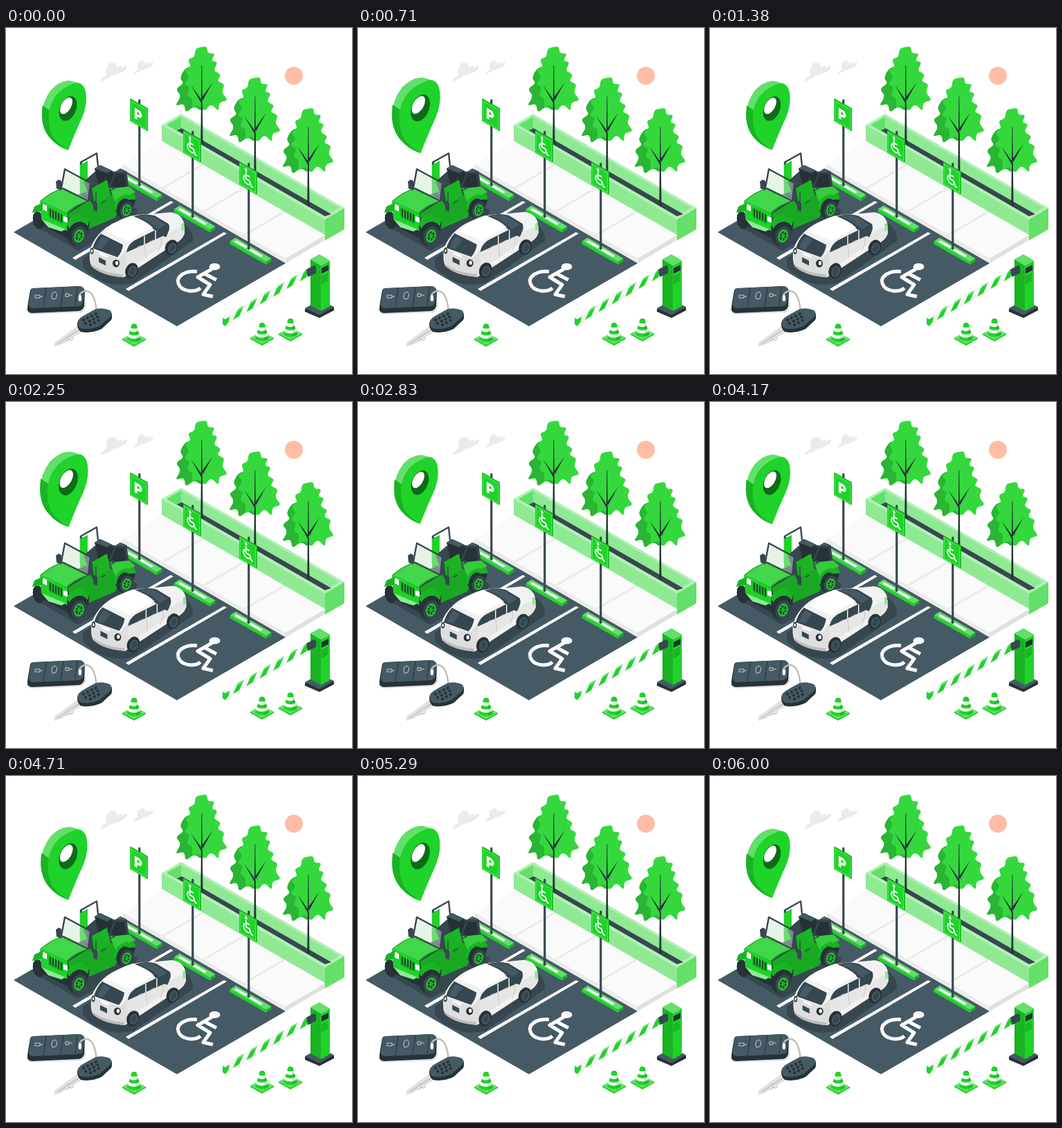
An HTML page that plays this animation: 500 px wide and 500 px high, repeating every 6040 ms.

```html
<!DOCTYPE html>
<html lang="en">
<head>
<meta charset="utf-8">
<title>Isometric car park</title>
<style>
html, body { margin: 0; width: 100%; height: 100%; overflow: hidden; background: #fff }
svg { display: block; width: 100vw; height: 100vh }
.g { fill: #1fd32a } .m { fill: #19b323 } .l { fill: #62e069 } .p { fill: #8fe993 }
.d { fill: #455a64 } .k { fill: #37474f } .b { fill: #263238 } .w { fill: #fff }
.s { fill: none; stroke: #37474f; stroke-width: 2.4; stroke-linejoin: round; stroke-linecap: round }
.i { fill: none; stroke: #fff; stroke-linejoin: round }
</style>
</head>
<body>
<svg viewBox="0 0 500 500">
<defs>
  <g id="tree">
    <path id="leafDark" fill="#2ab534"/>
    <path id="leaf" fill="#34d83d"/>
    <path class="b" d="M282.500 54h.8l1.200 114h-3.200zM283 110L267 82 282 103zM283 107L299 78 284 99z"/>
  </g>
  <g id="stop">
    <path class="l" d="M324 308L332 303 383.500 333 376 338z"/>
    <path class="g" d="M324 308L376 338V342L323 312z"/>
    <path class="m" d="M376 338L383.500 333V337L376 342z"/>
    <path class="w" d="M330 309l3-2 16 9-3 2zM351 321l3-2 17 10-3 2z"/>
  </g>
  <g id="sign">
    <path class="k" d="M191.200 104q1.600-2 3.200 0v124q-1.600 1.500-3.200 0z"/>
    <path class="m" d="M179 103l1.500-1 24.500 14v32l-1.500 1z"/>
    <path class="g" d="M179 102.500l25 14.400v32l-25-14.400z"/>
    <path class="l" d="M180.200 104.600l22.600 13v29.300l-22.600-13z"/>
    <path class="g" d="M181 106l21 12.100v27.400l-21-12.100z"/>
  </g>
  <g id="chair" class="i" stroke-width="2">
    <circle cx="-2" cy="-11" r="2.200" class="w" stroke="none"/>
    <path d="M-2-8V2H4L7 9 10 8M-2-4H4M-4-2A6 6 0 1 0 4 7"/>
  </g>
  <g id="cone">
    <path class="g" d="M168 449v2l17 9.500 17-9.500v-2z"/>
    <path class="l" d="M168 449l17-9 17 9-17 9z"/>
    <path class="g" d="M181.500 428.500q3.500-2.500 7 0l6.500 22q-10 7-20 0z"/>
    <path class="w" d="M179.800 433q5 3 10.400 0l1.300 4.500q-6.500 4-13 0zM177.300 442q7.500 5 15.400 0l1.300 4.500q-9 5-18 0z"/>
    <path fill="#0d8016" opacity=".2" d="M187 428q1.500 0 1.500 1l6.500 22q-3 3-7 3z"/>
  </g>
  <g id="wheel" transform="rotate(18)">
    <ellipse class="b" cx="-4" cy="-1" rx="11" ry="16"/>
    <ellipse class="b" rx="12.500" ry="16.500"/>
    <ellipse class="k" cx="2" cy="1" rx="10.500" ry="14"/>
    <ellipse class="g" cx="2" cy="1" rx="7" ry="9.500"/>
    <ellipse class="b" cx="2" cy="1" rx="5" ry="7"/>
    <path class="s" style="stroke:#19b323;stroke-width:2" d="M2-6V8M-3 4L7-2M-3-3L7 5"/>
  </g>
  <g id="tyre" transform="rotate(22)">
    <ellipse class="b" rx="9" ry="11.500"/>
    <ellipse class="d" cx="1.500" cy=".5" rx="6" ry="8"/>
    <ellipse class="k" cx="1.500" cy=".5" rx="4" ry="6"/>
  </g>
  <path id="cloud" fill="#ebebeb" d="M138 78q-2-6 7-10q-2-16 8-18q7 0 8 8q4-7 8-1q6-6 6 0q-3 6-12 9q-14 4-25 12z"/>
</defs>

<circle cx="416" cy="69" r="13" fill="#ffbda7"/>
<use href="#cloud"/>
<use href="#cloud" transform="translate(81.500 9) scale(.75)"/>

<!-- pavement and planter -->
<path fill="#fafafa" d="M168 197L226 163 462 299 404 333z"/>
<path fill="#ebebeb" d="M168 197L404 333V340L168 204z"/>
<path fill="#e0e0e0" d="M404 333L462 299V306L404 340z"/>
<path stroke="#ebebeb" stroke-width="3" d="M227 231L285 197M286 265L344 231M345 299L403 265"/>
<path class="p" d="M225 140L461 276V299L225 163z"/>
<path class="l" d="M461 276L489 260V291L461 307z"/>
<path fill="#b2f0b5" d="M225 140L253 124 489 260 461 277z"/>
<path class="p" d="M232 140L253 128 482 260 461 272z"/>
<path class="l" d="M232 140L253 128V146L247 149z"/>
<path class="k" d="M247 148L254 145 470 269 461 272z"/>
<use href="#tree"/>
<use href="#tree" x="77" y="44.500"/>
<use href="#tree" x="154" y="89"/>

<!-- tarmac -->
<path class="d" d="M11 295L168 204 404 340 247 431z"/>
<path class="w" d="M96 332L238 250 242 252 100 335zM173 377L315 295 319 297 177 380z"/>
<g class="i" stroke-width="5">
  <ellipse class="w" cx="301.500" cy="345" rx="8" ry="5" stroke="none"/>
  <path d="M298 348L277 360 295 371 285 385 299 388M287 355L304 364M276 352C257 350 246 360 249 369 253 381 272 383 281 376"/>
</g>
<use href="#stop" x="-158" y="-92"/>
<use href="#stop" x="-81" y="-46.500"/>
<use href="#stop"/>
<use href="#sign"/>
<use href="#sign" x="77" y="45.500"/>
<use href="#sign" x="158" y="91.500"/>
<text class="w" transform="matrix(.87 .5 0 1 185 130)" font-family="Inter, Arial, sans-serif" font-weight="900" font-size="21">P</text>
<use href="#chair" transform="matrix(.87 .5 0 1 267.500 171)"/>
<use href="#chair" transform="matrix(.87 .5 0 1 348.500 217)"/>

<!-- jeep -->
<path class="k" d="M38 283L112 238 190 262 186 277 104 322z"/>
<path class="s" d="M108 233V194L131 181 135 218M108 194L111 199V230"/>
<path class="g" d="M107 198L118 192V235L107 240z"/>
<path class="k" d="M112 222L128 208 152 206 175 213 178 233 150 245 124 252z"/>
<path class="b" d="M128 203l8-5 17 8 3 22-21 6zM150 213l15-10 9 4 3 22-20 9z"/>
<path class="d" d="M128 203l8-5 17 8-7 4zM158 208l7-5 9 4-6 4z"/>
<path class="s" d="M150 229L158 209 172 209 176 232"/>
<ellipse class="b" cx="47" cy="278" rx="8" ry="13" transform="rotate(-12 47 278)"/>
<path fill="#1aa824" d="M90 268L121 249 126 256 146 240 155 242 158 232 177 230 186 239 185 250 165 256 158 274 118 291 112 282 92 288z"/>
<path class="m" d="M123 232L146 219 151 241 128 257z"/>
<path fill="#37cb40" d="M150 232L178 229 187 237 158 251z"/>
<path class="b" d="M158 264Q161 246 175 244 186 242 187 250L184 257Q173 246 164 272z"/>
<path class="m" d="M155 258Q160 243 174 240L187 243V248Q168 246 161 266z"/>
<path class="m" d="M49 250Q66 235 84 231L121 249Q97 258 88 269z"/>
<path fill="#42d64b" d="M51 250Q68 236 85 232L119 249Q97 256 87 267z"/>
<path class="g" d="M49 250L89 269 88 293 51 276z"/>
<path class="m" d="M60 258L82 269V283L62 274z"/>
<path class="s" style="stroke:#263238;stroke-width:1.7" d="M64 262v10M68 264v10M72 266v10M76 268v10M80 270v10"/>
<path class="w" d="M53 254l6 3v8l-6-3zM83 272l6 2v8l-6-3z"/>
<path class="m" d="M38 267L41 258 54 252 51 265z"/>
<path class="b" d="M88 288Q94 274 107 272L121 279 119 294Q109 280 100 286L93 298z"/>
<path class="m" d="M87 283Q94 271 106 269L121 277 118 286Q109 276 100 282L92 290z"/>
<path class="b" d="M39 270l10-4 2 10 37 18 8-4v10l-7 4-50-26z"/>
<path class="p" d="M51 276L86 291 80 294 61 288z"/>
<use href="#wheel" x="104" y="299"/>
<use href="#wheel" transform="translate(173 262) scale(.88)"/>
<path fill="#c5e7c8" opacity=".45" d="M86 205L122 225 118 249 82 231z"/>
<path class="s" d="M85 204L122 224 119 250 80 231zM126 252L122 224"/>
<path class="k" d="M72 222l4-3 4 2v14l-7-3zM125 252l4-2 3 3v12l-5-1z"/>
<path class="s" style="stroke-width:1.500" d="M130 238v20M150 235l7-3M138 253l6-3"/>

<!-- car -->
<path class="k" d="M111 333L180 284 254 280Q272 292 270 308L185 368Q140 379 111 345z"/>
<g id="car">
  <path fill="#f2f2f2" d="M121 323Q123 311 133 299 144 286 161 279 183 268 207 269L238 266Q253 268 257 281L258 296Q256 304 248 309L187 349 170 360Q137 357 123 343 120 337 121 323z"/>
  <path fill="#dedede" d="M121 319L163 333 174 320 179 345 169 360Q137 357 123 343z"/>
  <path fill="#e6e6e6" d="M173 324L235 297 247 289 258 286V297L248 309 228 313 188 341 174 352z"/>
  <path class="k" d="M125 318Q129 305 137 297L169 313Q168 323 161 331z"/>
  <path class="d" d="M130 317Q134 306 139 301L149 306 138 320z"/>
  <path class="k" d="M184 272Q200 267 215 271L235 283Q238 291 232 298L174 324Q175 314 185 307L215 292Q203 280 184 272z"/>
  <path class="d" d="M188 272Q203 269 214 273L231 284 220 291Q208 278 188 272z"/>
  <path class="w" d="M148 290Q160 278 181 271 202 278 212 288 194 297 177 308L145 294z"/>
  <path fill="none" stroke="#f2f2f2" stroke-width="1.500" d="M200 300V313M216 292V306"/>
  <path fill="none" stroke="#bdbdbd" stroke-width=".8" d="M200 312L202 332M224 302Q227 309 220 322M189 317l6-3M207 309l6-3"/>
  <path class="k" d="M225 293l7-1 2 4-3 6-5-2zM134 331l10 5v7l-10-5z"/>
  <path class="w" d="M135 324l12 5v3l-12-5z"/>
  <ellipse class="b" cx="159" cy="340" rx="5" ry="5.500"/>
  <ellipse class="w" cx="160" cy="339.500" rx="2.200" ry="3"/>
  <ellipse class="b" cx="124" cy="322" rx="2.500" ry="4.500"/>
  <ellipse class="w" cx="124" cy="322" rx="1.200" ry="2.500"/>
  <path class="p" d="M253 283l4-2 1 10-4 3z"/>
  <path fill="#bdbdbd" d="M123 341Q140 354 169 356V360Q138 358 123 344z"/>
  <use href="#tyre" x="181.500" y="350.500"/>
  <use href="#tyre" x="239" y="317"/>
</g>

<!-- barrier -->
<path class="b" d="M432 406L453 394 474 404V408L453 419 432 410z"/>
<path class="d" d="M432 405L453 393 474 403 453 415z"/>
<path class="m" d="M440 334L455 343V409L440 401z"/>
<path class="g" d="M455 343L468 336V402L455 409z"/>
<path class="l" d="M440 334L453 327 468 336 455 343z"/>
<path class="b" d="M456 347l10-5v8l-10 5z"/>
<path stroke="#0d8016" d="M456 360l9-5M456 363l9-5M456 366l9-5M456 369l9-5"/>
<path fill="#f5f5f5" d="M313 419L434 349 437 351V360L317 431 313 428z"/>
<g id="bands"></g>
<path class="k" d="M434 349L445 343 448 345V354L436 360z"/>

<use href="#cone"/>
<use href="#cone" x="185" y="-1.500"/>
<use href="#cone" x="226" y="-7.500"/>

<!-- keys -->
<path fill="#e0e0e0" d="M29 406l6 8 75-3 6-8-4-20z"/>
<path class="b" d="M32 396L35 379Q36 376 41 376L106 373Q113 374 114 380L113 402Q111 408 105 409L38 412Q30 412 31 404z"/>
<path class="d" d="M33 396L36 379Q37 376 41 376L106 373Q112 374 113 379L111 397Q110 401 105 402L38 405Q32 404 33 396z"/>
<path class="s" style="stroke:#263238;stroke-width:1" d="M58 376L54 404M83 375L79 402M103 374L100 401"/>
<path fill="none" stroke="#cfd8dc" stroke-width=".9" d="M42 386h7v4h-7zM49 388h4M67 383l4-2 3 4-2 6-5 1-1-4zM86 384h5v4h-5zM91 386h5"/>
<path fill="none" stroke="#bdbdbd" stroke-width="2.400" d="M106 394Q104 381 116 380 129 381 131 412"/>
<rect class="w" x="105" y="386" width="4" height="9" rx="2"/>
<path fill="#e0e0e0" d="M104 430L113 437 81 457 69 461 71 454z"/>
<path fill="none" stroke="#bdbdbd" stroke-width="1.200" d="M107 435L74 457M88 453l3-3 4 1 3-4"/>
<path class="b" d="M103 428Q103 421 112 416L130 406Q144 404 151 409 155 415 152 422L138 435Q122 442 108 439 103 435 103 428z"/>
<path class="d" d="M104 425Q105 420 112 416L130 406Q144 404 151 409 154 413 150 418L136 430Q122 437 108 434 103 431 104 425z"/>
<path class="s" style="stroke:#263238;stroke-width:4;stroke-dasharray:.1 6.500" d="M112 422L130 413M115 427L137 415M122 429L135 422"/>

<!-- map pin -->
<g id="pin">
  <path class="l" d="M89 76.500Q96 76 105 81L90 176Q75 171 64 159 52 145 52 126 53 106 65 90 76 78 89 76.500z"/>
  <path class="m" d="M53 112L63 119 66 145 89 176Q73 170 64 159 49 143 53 112z"/>
  <path class="g" d="M95 82Q108 75 114 89 119 108 109 131 101 148 90 176 75 168 67 155 61 143 62 124 66 93 95 82z"/>
  <ellipse cx="89.500" cy="116.500" rx="11.500" ry="18.500" fill="#0f6b17" transform="rotate(22 89.500 116.500)"/>
  <ellipse class="w" cx="87" cy="112.500" rx="7" ry="13" transform="rotate(30 87 112.500)"/>
</g>
</svg>
<script>
const $ = id => document.getElementById(id);

// Closed wavy outline: curves between midpoints, bent by each point.
function wavy(pts) {
  const mid = i => {
    const [x, y] = pts[i], [u, v] = pts[(i + 1) % pts.length];
    return `${(x + u) / 2} ${(y + v) / 2}`;
  };
  return 'M' + mid(pts.length - 1) + pts.map(([x, y], i) => `Q${x} ${y} ${mid(i)}`).join('') + 'z';
}

$('leafDark').setAttribute('d', wavy([[262, 54], [250, 72], [258, 80], [244, 88], [254, 98], [243, 114],
  [258, 108], [259, 124], [272, 112], [284, 122], [290, 100], [280, 60]]));
$('leaf').setAttribute('d', wavy([[283, 27], [273, 30], [273, 42], [262, 45], [268, 56], [257, 62], [266, 70],
  [256, 82], [267, 85], [260, 98], [270, 101], [268, 118], [278, 110], [287, 122], [296, 108], [308, 122],
  [307, 107], [322, 105], [311, 93], [317, 81], [304, 77], [312, 67], [299, 62], [307, 49], [296, 48],
  [303, 36], [291, 37], [291, 27]]));

// Slanted green bands along the barrier arm, with a lighter top edge.
const onArm = (x, drop) => `${x} ${419 - (x - 313) * 0.579 + drop}`;
const band = (x, from, to, cls) => {
  const lean = drop => x + 6 - drop * 0.6;
  return `<path class="${cls}" d="M${onArm(lean(from), from)}L${onArm(lean(from) + 9, from)}` +
    `L${onArm(lean(to) + 9, to)}L${onArm(lean(to), to)}z"/>`;
};
let bands = '<path class="g" d="M313 419l4 2v10l-4-3zM317 421l6-4-1 7-5 7z"/>';
for (let x = 329; x < 430; x += 19.3) bands += band(x, 0, 2.5, 'l') + band(x, 2.5, 11.5, 'g');
$('bands').innerHTML = bands;

const LOOP = 6040, BEAT = LOOP / 4;

// CSS "ease" curve: cubic-bezier(.25, .1, .25, 1).
function ease(x) {
  let lo = 0, hi = 1, u = 0.5;
  for (let i = 0; i < 20; i++) {
    u = (lo + hi) / 2;
    if (0.75 * u * (1 - u) + u ** 3 < x) lo = u; else hi = u;
  }
  return 0.3 * u * (1 - u) ** 2 + 3 * u * u * (1 - u) + u ** 3;
}

function draw(now) {
  const beat = (now % LOOP) / BEAT;
  const p = (beat + 0.05) % 1;
  const grow = p < 0.5 ? ease(p * 2) : 1 - ease(p * 2 - 1);
  $('pin').setAttribute('transform', `translate(84 126.5) scale(${1 + 0.1 * grow}) translate(-84 -126.5)`);
  const sway = Math.cos(2 * Math.PI * (beat - 0.32));
  $('car').setAttribute('transform', `translate(${1.2 + 2.6 * sway} ${-0.4 * sway})`);
}

const start = performance.now();
function tick() {
  draw(performance.now() - start);
  requestAnimationFrame(tick);
}
tick();
</script>
</body>
</html>
```
